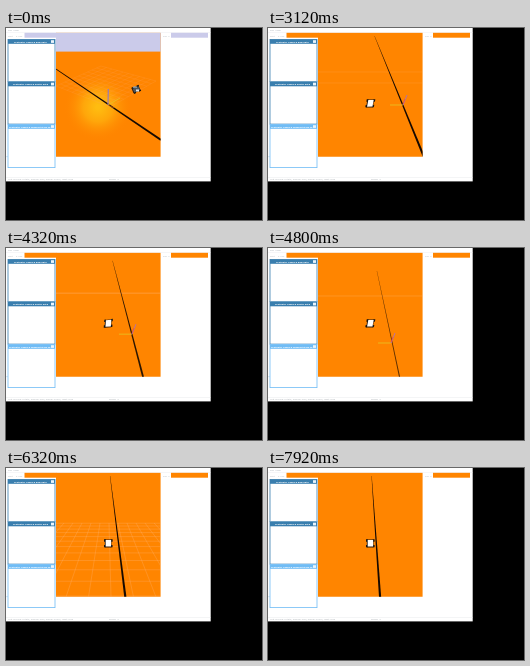
Write an HTML page with a canvas that moves like this. It is 256 by 192 pixels and loops after 8 s.

```html
<!DOCTYPE html>
<html lang="en">
<head>
<meta charset="utf-8">
<title>Robot car simulation</title>
<style>
html, body { margin: 0; width: 100%; height: 100%; overflow: hidden; background: #000; }
canvas { display: block; width: 256px; height: 192px; }
</style>
</head>
<body>
<canvas id="stage" width="256" height="192"></canvas>
<script>
const ctx = document.getElementById('stage').getContext('2d');
const LOOP = 8000, STEP = 80, FOLLOW_START = 2240;
const ORANGE = '#ff8500', SKY = '#cbcbea', BLACK = '#160900';
const scene = { left: 50, top: 4.7, right: 154.6, bottom: 128.7 };

const mix = (a, b, k) => a + (b - a) * k;
const bell = (t, centre, spread) => Math.exp(-(((t - centre) / spread) ** 2));

function rect(x, y, w, h, color) {
  ctx.fillStyle = color;
  ctx.fillRect(x, y, w, h);
}

function line(x1, y1, x2, y2, color, width = 1) {
  ctx.strokeStyle = color;
  ctx.lineWidth = width;
  ctx.beginPath();
  ctx.moveTo(x1, y1);
  ctx.lineTo(x2, y2);
  ctx.stroke();
}

// A stripe on the ground, tapering towards the distance.
function taper(x1, y1, w1, x2, y2, w2, color) {
  const length = Math.hypot(x2 - x1, y2 - y1);
  const nx = (y1 - y2) / length / 2, ny = (x2 - x1) / length / 2;
  ctx.fillStyle = color;
  ctx.beginPath();
  ctx.moveTo(x1 + nx * w1, y1 + ny * w1);
  ctx.lineTo(x2 + nx * w2, y2 + ny * w2);
  ctx.lineTo(x2 - nx * w2, y2 - ny * w2);
  ctx.lineTo(x1 - nx * w1, y1 - ny * w1);
  ctx.fill();
}

function label(text, x, y, color, size = 2.5, weight = '') {
  ctx.fillStyle = color;
  ctx.font = `${weight} ${size}px "Open Sans", sans-serif`;
  ctx.fillText(text, x, y);
}

function car(x, y, angle, skew, squash, bodyColor) {
  ctx.save();
  ctx.translate(x, y);
  ctx.scale(1, squash);
  ctx.rotate(angle);
  ctx.transform(1, 0, skew, 1, 0, 0);
  rect(-3.5, -3.7, 6.7, 7.9, '#2a1a10');
  for (const side of [-1, 1])
    for (const end of [-1, 1])
      rect(side * 3.4 - 0.9, end * 2.8 - 1.2, 1.8, 2.4, '#17130f');
  rect(-2.6, -3.3, 5.4, 6.6, bodyColor);
  ctx.restore();
}

function overview() {
  rect(50, 0, 105, 23.6, SKY);
  const glow = ctx.createRadialGradient(92, 79, 2, 92, 79, 34);
  glow.addColorStop(0, '#ffbc10');
  glow.addColorStop(0.4, '#ffa60a');
  glow.addColorStop(1, 'rgba(255,133,0,0)');
  rect(50, 40, 90, 80, glow);

  const faint = 'rgba(255,165,110,.3)';
  for (let k = 0; k <= 1; k += 0.1) {
    line(mix(95, 150, k), mix(38, 53, k), mix(50, 104, k), mix(58, 79, k), faint, 0.5);
    line(mix(95, 50, k), mix(38, 58, k), mix(150, 104, k), mix(53, 79, k), faint, 0.5);
  }
  taper(50, 41, 0.8, 155, 112, 2, BLACK);
  line(102, 77, 102.3, 61, '#8d78c8', 1.1);
  line(102, 77, 114, 70, '#e5c52a', 0.7);
  line(102, 77, 108, 80, '#f06a18', 0.6);
  car(130.3, 61.3, 1.25, 0.2, 0.75, '#4c565e');
  rect(130, 61.5, 3, 2, '#dde2e6');
  rect(127, 58.5, 4, 1.3, '#8ba6ba');
}

function grid(t) {
  const color = `rgba(255,178,115,${0.5 * bell(t, 6320, 600)})`;
  const shift = (t - 6320) / 420 % 1;
  for (let i = 0; i < 12; i++) {
    const y = 8 + 120 / (1 + (i - shift) * 0.14);
    line(50, y, 155, y, color, 0.6);
  }
  for (let i = -6; i <= 6; i++)
    line(103 + i * 9, 55, 105 + i * 22.5, 129, color, 0.6);
}

function followView(t) {
  const age = t - 3120;
  const tilt = bell(t, 4800, 450);
  const decay = Math.exp(-age / 2720);

  grid(t);
  const horizon = 44 + 4 * tilt - 1.5 * bell(t, 3840, 350);
  const faint = `rgba(255,185,130,${0.45 * bell(t, 3900, 1100)})`;
  line(50, horizon, 155, horizon, faint, 0.6);
  line(50, horizon + 11 * bell(t, 3120, 600), 155, horizon + 11 * bell(t, 3120, 600), faint, 0.6);

  ctx.globalAlpha = 1 - 0.3 * tilt;
  taper(103 + 3.5 * decay + 4 * tilt, 8 + 15 * tilt, 0.25,
        103 + 53 * decay, 129, 2.2 - 1.1 * tilt, BLACK);
  ctx.globalAlpha = 1;

  const axisX = 103 + 32 * Math.exp(-age / 3600);
  const axisY = 76 + 18 * (age / 1680) ** 2;
  line(axisX - 13, axisY + 1, axisX, axisY + 1, '#e6c424', 0.8);
  line(axisX, axisY + 1, axisX + 4, axisY - 9, '#b06fae', 1);
  line(axisX, axisY, axisX + 2, axisY - 5, '#ef4938', 0.7);
  const turn = bell(t, 3840, 350);
  const skew = -0.2 / (1 + Math.exp((t - 5500) / 250)) * (1 - turn);
  car(102.3, 75.3, -0.6 * turn, skew, 1, '#fffdf9');
}

function panel(y, height, title, color, x) {
  rect(2, y, 47, height, '#fff');
  ctx.strokeStyle = color;
  ctx.lineWidth = 0.8;
  ctx.strokeRect(2, y + 0.4, 47, height - 0.8);
  rect(2, y + 0.4, 47, 4.4, color);
  ctx.save();
  ctx.beginPath();
  ctx.rect(2, y, 42.5, 5);
  ctx.clip();
  label(title, x, y + 3.5, '#fff', 2.4, 'bold');
  ctx.restore();
  rect(45, y + 1.2, 3, 2.7, '#e9f4fc');
}

function draw(t) {
  const following = t >= FOLLOW_START;
  const backdrop = following ? ORANGE : SKY;
  rect(0, 0, 256, 192, '#000');
  rect(0, 0, 204.7, 153.4, '#fff');
  rect(18.5, scene.top, 32, 5, backdrop);
  rect(165, scene.top, 37, 5, backdrop);

  ctx.save();
  ctx.beginPath();
  ctx.rect(scene.left, scene.top, scene.right - scene.left, scene.bottom - scene.top);
  ctx.clip();
  rect(50, 0, 105, 130, ORANGE);
  following ? followView(t) : overview();
  ctx.restore();

  rect(0, 4, 204.7, 0.4, '#e7e9ed');
  label('File  View', 2, 3, '#a5adb5');
  label('Test', 2, 8.5, '#aab0b7');
  label('x  Par', 10, 8.5, '#aab0b7');
  label('Par  x', 157, 8.5, '#aab0b7');
  rect(0, 128.5, 2, 0.6, '#b7d5ed');
  rect(0, 149, 204.7, 0.4, '#e4e6e9');
  label('Left mouse: rotate, middle: pan, wheel: zoom, right: pick', 2, 152, '#a8adb2');
  label('Ready  0', 103, 152, '#a8adb2');

  panel(11, 43, 'Synthetic Camera RGB data', '#397eae', 8);
  panel(53.5, 43, 'Synthetic Camera Depth data', '#397eae', 7);
  panel(96, 44, 'Synthetic Camera Segmentation Mask data', '#70bcf5', 3);
}

function frame() {
  const t = performance.now() % LOOP;
  draw(Math.floor(t / STEP) * STEP);
  requestAnimationFrame(frame);
}
frame();
</script>
</body>
</html>
```
